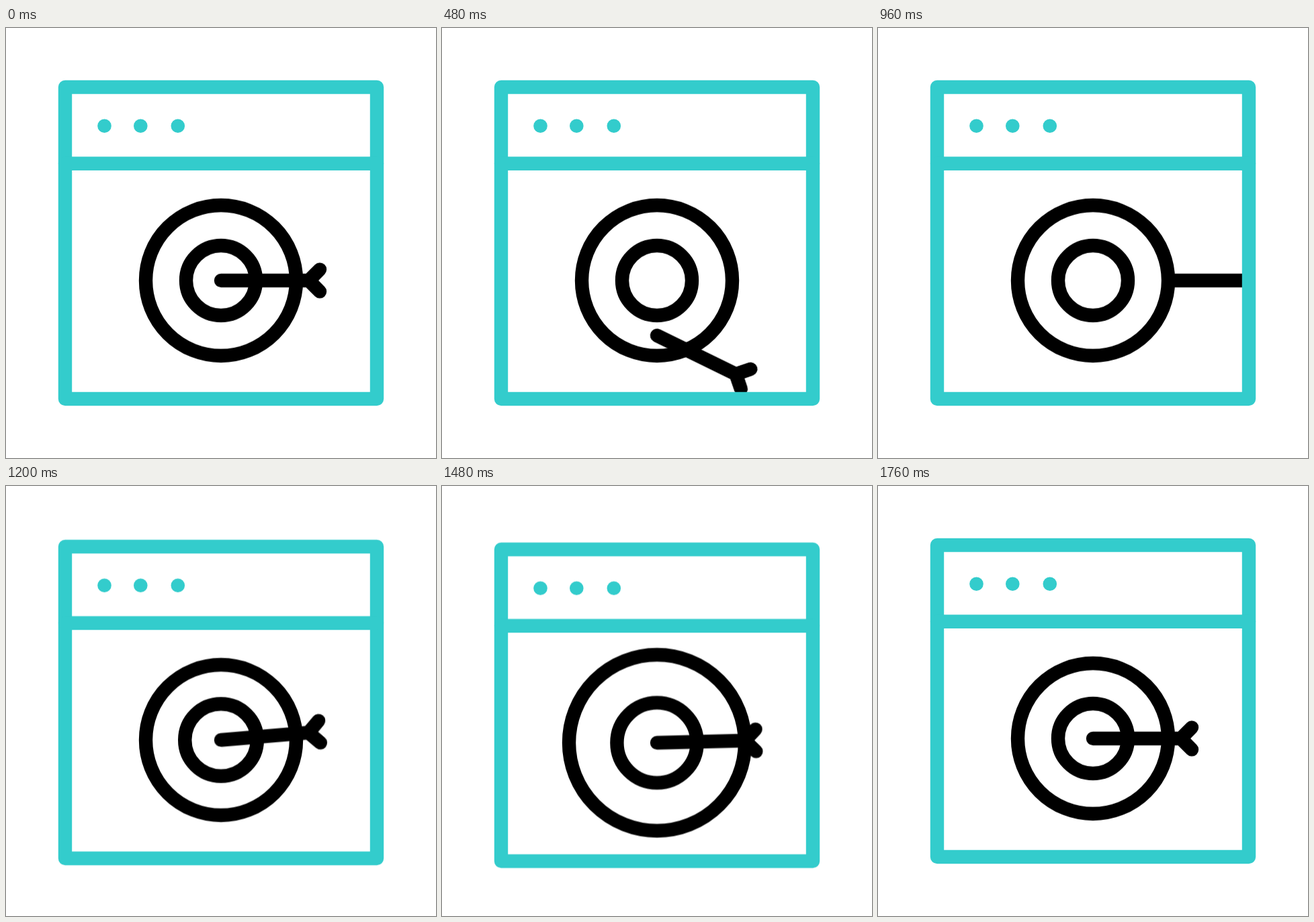
Animation, 640 px wide and 640 px high, one loop 1.84 s. Source, as an HTML page without scripts:

```html
<!DOCTYPE html>
<html lang="en">
<head>
<meta charset="utf-8">
<title>Arrow on target</title>
<style>
  html, body { margin: 0; width: 100%; height: 100%; overflow: hidden; background: #fff; }
  svg { display: block; width: 100%; height: 100%; }

  .ink, .window {
    fill: none;
    stroke: #000;
    stroke-width: 20.4;
    stroke-linecap: round;
    stroke-linejoin: round;
  }
  .window { stroke: #3cc; }
  .dots { fill: #3cc; stroke: none; }

  .bounce, .inner, .outer, .flight, .wobble {
    animation: 1840ms cubic-bezier(.37, 0, .63, 1) infinite;
  }
  .bounce { animation-name: bounce; }
  .inner { r: 52px; animation-name: inner; }
  .outer { r: 112px; animation-name: outer; }
  .flight { animation-name: flight; }
  .wobble { animation-name: wobble; }

  @keyframes bounce {
    0%, 58.696%, 95.652%, 100% { transform: none; }
    76.087% { transform: translateY(7.2px); }
  }
  @keyframes inner {
    0%, 60.87%, 91.304%, 100% { r: 52px; }
    76.087% { r: 61.4px; }
  }
  @keyframes outer {
    0%, 65.217%, 95.652%, 100% { r: 112px; }
    80.435% { r: 131px; }
  }
  /* Drops out of the window, then flies back in from the right. */
  @keyframes flight {
    0% { transform: translate(0, 0) rotate(0deg); }
    8.696% { transform: translate(0, 0) rotate(0deg); animation-timing-function: ease-in; }
    36.957% { transform: translate(0, 182px) rotate(58deg); animation-timing-function: step-end; }
    41.304% { transform: translate(240px, 0) rotate(0deg); animation-timing-function: cubic-bezier(.33, .2, .67, .67); }
    60.87%, 100% { transform: translate(0, 0) rotate(0deg); }
  }
  @keyframes wobble {
    0%, 60.87% { transform: rotate(0deg); }
    65.217% { transform: rotate(-4.8deg); }
    71.739% { transform: rotate(4deg); }
    78.261% { transform: rotate(-2.4deg); }
    84.783% { transform: rotate(1.4deg); }
    91.304%, 100% { transform: rotate(0deg); }
  }
</style>
</head>
<body>
<svg viewBox="0 0 640 640">
  <clipPath id="pane"><rect x="88" y="88" width="464" height="464"/></clipPath>
  <g class="bounce">
    <g class="ink" clip-path="url(#pane)">
      <g transform="translate(320 375.8)">
        <circle class="outer" r="112"/>
        <circle class="inner" r="52"/>
        <g class="flight">
          <path class="wobble" d="M0 0H130.7M147 -16.4L130.7 0L147 16.4"/>
        </g>
      </g>
    </g>
    <g class="window">
      <rect x="88" y="88" width="464" height="464"/>
      <path d="M88 201.8H552"/>
      <g class="dots">
        <circle cx="146.5" cy="145.8" r="10.3"/>
        <circle cx="200.3" cy="145.8" r="10.3"/>
        <circle cx="255.8" cy="145.8" r="10.3"/>
      </g>
    </g>
  </g>
</svg>
</body>
</html>
```
